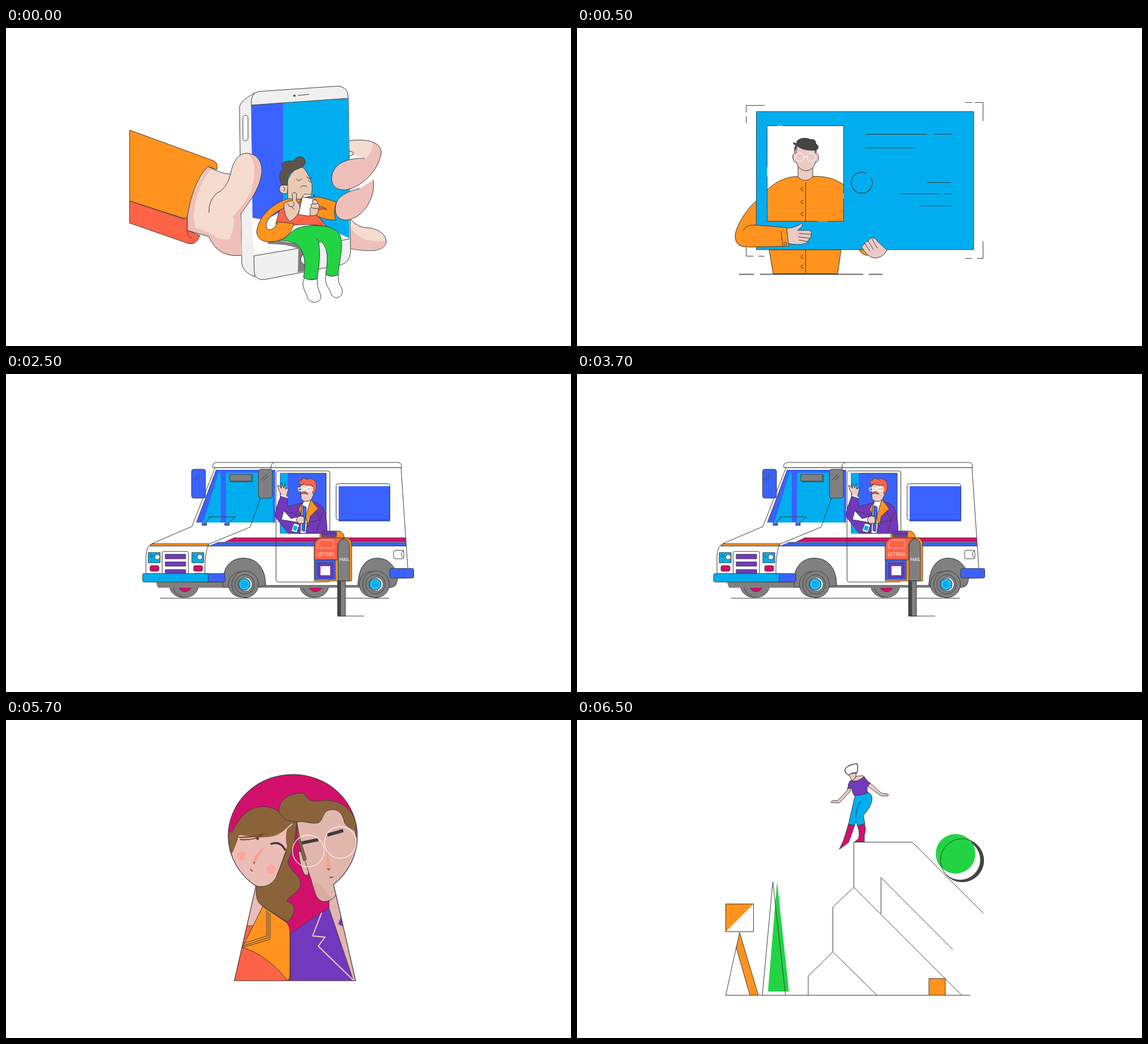
Recreate the animation shown at these times as an HTML page. Size 997 px wide and 561 px high, loop 8000 ms.

```html
<!DOCTYPE html>
<html lang="en">
<head>
<meta charset="utf-8">
<title>Five scenes</title>
<style>
html, body { margin: 0; width: 100%; height: 100%; overflow: hidden; background: #fff; }
svg { display: block; width: 100%; height: 100%; }
.scene { visibility: hidden; fill: none; stroke: #3c3c3c; stroke-width: 1; stroke-linejoin: round; }
.scene.on { visibility: visible; }
.o { fill: #ff931e; } .r { fill: #ff6347; } .b { fill: #3a62ff; } .c { fill: #00aeef; }
.g { fill: #22d444; } .v { fill: #7238bd; } .m { fill: #d2106b; } .w { fill: #fff; }
.s { fill: #f5dccf; } .p { fill: #efbfba; } .k { fill: #edcbc5; } .h { fill: #8b633b; }
.t { fill: #ecc9b3; } .ka { fill: #ebbdb6; } .kb { fill: #e1b6ad; }
.l { fill: #f0f0f0; } .y { fill: #808080; } .d { fill: #444; }
.x { stroke: none; }
text { font: 7.6px Lato, "Open Sans", sans-serif; fill: #fff; stroke: none; text-anchor: middle; }
</style>
</head>
<body>
<svg viewBox="0 0 997 561" preserveAspectRatio="none">
<defs>
  <clipPath id="photo"><path d="M335.500 172.500H470.500V341H335.500Z"/></clipPath>
  <clipPath id="keyhole"><path id="keypath" d="M441 293A114 109 0 0 1 392 205A114 109 0 0 1 620 205A114 109 0 0 1 578 290L617 460H403Z"/></clipPath>
  <clipPath id="hand"><path d="M356 244Q378 257 396 258C400 238 408 221 425 221C446 222 453 240 451 256C448 281 433 303 414 328L416 401Q374 406 358 368L320 357V334Q328 276 356 244Z"/></clipPath>
  <clipPath id="finger"><path d="M606 199C632 195 664 199 662 222C656 254 626 281 600 285.500C582 287 573 277 575 261C579 240 599 229 633 230L606 222Z"/></clipPath>
</defs>

<!-- phone -->
<g class="scene">
  <path class="o" d="M218 180L366 234Q375 238 372 250L356 244Q329 276 320 334Q318 338 308 334L218 305Z"/>
  <path class="r" d="M218 305L308 335Q316 338 320 334V357L342 366Q336 384 321 380L218 344Z"/>
  <path d="M320 357Q320 369 328 371"/>
  <path class="s" d="M607 336Q620 354 645 353Q671 360 671 377C667 399 629 393 606 389Z"/>
  <path class="p x" d="M608 352Q624 380 670 376C668 397 629 392 608 388Z"/>
  <path class="l" d="M412 140C414 128 429 121 439 114V439Q417 430 416 415Z"/>
  <path class="l" d="M433 136Q431 114 446 112L585 102.500Q603 103 604 122L608 395Q607 414 590 418L455 444Q438 444 438 430Z"/>
  <path class="w x" d="M434 330L606 345V372L437 402Z"/>
  <path class="b x" d="M433 136L490 132V342L435 334Z"/>
  <path class="c x" d="M489 132L604 124L606 371L560 350L489 340Z"/>
  <path d="M433 136L604 124M435 334L454 338M437 402L526 387M585 376L606 372"/>
  <rect class="w" x="418" y="154" width="9" height="45" rx="4.500"/>
  <circle class="d x" cx="509" cy="119.500" r="2"/>
  <path d="M515 119L535 117"/>
  <path class="y x" d="M462 376Q490 373 530 386L526 429L515 431L516 390Q500 381 462 381Z"/>
  <circle class="w" cx="530" cy="408" r="10"/>
  <!-- sitter -->
  <path class="w x" d="M481 326L478 345Q472 356 463 357Q455 348 466 334Z"/>
  <path class="r" d="M482 323Q490 303 515 302L555 303L549 330L566 350Q530 344 500 349L476 346Z"/>
  <path class="o" d="M542 297Q560 299 583 307Q577 322 582 339Q562 339 548 331L551 314Z"/>
  <path class="r" d="M553 315Q564 315 566 321Q562 317 552 321"/>
  <path class="o" d="M520 297C488 298 452 321 444 351C438 369 451 378 466 377C489 377 503 365 508 345L480 342C475 351 470 357 463 356C455 350 461 336 470 330Q481 321 495 315L520 306Z"/>
  <path class="g" d="M481 375C503 370 499 351 535 349C562 347 584 352 590 367C596 386 588 410 586 436Q574 441 564 434Q571 395 560 381Q553 373 552 380Q556 402 549 442Q535 447 525 440C530 411 526 389 510 380Q495 374 481 375Z"/>
  <path d="M552 380Q553 374 546 370"/>
  <path class="w" d="M527 441Q519 450 531 472Q533 484 545 484Q558 482 555 470Q547 453 550 442Q537 447 527 441ZM565 435Q560 446 571 462Q574 475 583 476Q596 474 593 460Q584 447 587 435Q575 441 565 435Z"/>
  <path class="t" d="M497 268Q509 243 524 246Q532 253 540 275Q541 288 538 297L517 302L497 301Z"/>
  <path class="t" d="M497 278Q484 273 482 284Q484 294 495 292"/>
  <path d="M489 281Q494 281 490 288M512 266Q517 273 522 265M530 262Q536 268 540 264M519 281Q525 276 531 280M533 268L538 273"/>
  <path fill="#5f5349" d="M487 277C480 264 483 253 490 248C481 237 496 233 508 235C511 225 526 224 528 235C529 243 521 246 514 249C500 254 496 261 497 271L495 277Z"/>
  <path class="t" d="M490 310Q498 304 506 305L505 293Q509 287 513 293L512 305Q521 311 518 321Q513 336 501 341Q491 334 490 310Z"/>
  <path d="M497 309Q498 316 505 315Q511 314 507 307M504 315L509 321"/>
  <path class="w" d="M523 298L527 293L544 294L545 299L536 332L516 329ZM523 298L542 301L545 294"/>
  <path class="t" d="M541 303Q551 302 550 309Q555 314 551 320Q552 329 544 331L536 331L537 324Q535 318 539 317Q536 311 541 310Z"/>
  <path d="M541 310Q546 312 550 309M539 317Q545 320 551 318"/>
  <!-- hand -->
  <g clip-path="url(#hand)">
    <path class="s x" d="M310 210H460V410H310Z"/>
    <path class="p x" d="M356 244L364 248Q335 278 331 336L334 352L357 361Q394 380 400 360Q405 327 398 335C412 318 436 297 438 259Q440 230 425 221H460V330L416 410H330L315 360V320Z"/>
    <path class="s x" d="M375 300L413 298L399 334Q403 355 395 372Q375 377 358 359Z"/>
  </g>
  <path d="M356 244Q378 257 396 258C400 238 408 221 425 221C446 222 453 240 451 256C448 281 433 303 414 328M416 401Q374 406 358 368L320 357V334Q328 276 356 244M396 258Q390 284 371 292Q357 306 358 326"/>
  <path class="p x" d="M648 268C653 296 632 336 600 339C583 338 578 325 583 308C589 293 607 288 624 283Z"/>
  <path d="M648 268C653 296 632 336 600 339C583 338 578 325 583 308C589 293 607 288 624 283"/>
  <g class="x" clip-path="url(#finger)"><path class="p" d="M570 190H670V290H570Z"/><path class="s" d="M606 190H644Q654 212 634 231Q614 229 600 234Z"/></g>
  <path d="M606 199C632 195 664 199 662 222C656 254 626 281 600 285.500C582 287 573 277 575 261C579 240 599 229 633 230M606 217Q614 218 613 223L606 226"/>
</g>

<!-- card -->
<g class="scene">
  <path class="o" d="M316 305C298 321 278 352 279 370Q281 388 302 386H340V305ZM339 391L346 433.500H460L466 391Z"/>
  <path class="c" d="M316.500 147.500H700V391H316.500Z"/>
  <g clip-path="url(#photo)">
    <path class="w x" d="M335 172H471V342H335Z"/>
    <path class="o" d="M330 291C348 272 370 261 391 262C430 261 450 260 475 280V345H330Z"/>
    <path class="k" d="M390 244V263Q403 275 416 263V244Z"/>
    <path class="k" d="M387 220Q379 221 381 230Q383 238 387 236Q390 251 404 252Q418 251 421 236Q426 237 426 229Q426 220 420 221V209H388Z"/>
    <path class="d x" d="M384 222Q382 211 386 206Q380 207 382 201Q389 206 387 200Q397 190 412 196Q422 195 422 204Q430 211 423 215L422 222L420 216Q399 218 388 208Z"/>
    <path stroke="#fff" d="M400 228a7 7.500 0 1 1-14 0a7 7.500 0 1 1 14 0M421 228a7.500 7.500 0 1 1-15 0a7.500 7.500 0 1 1 15 0M400 227H406"/>
    <path d="M403.500 272V341M400 285a2.500 2.500 0 1 1-1-3M400 308a2.500 2.500 0 1 1-1-3M400 329a2.500 2.500 0 1 1-1-3"/>
  </g>
  <path d="M353 172.500H335.500V246M335.500 262V341H425M442 341H470.500V301M470.500 292V172.500H363"/>
  <path d="M403.500 391V433M400 405a2.500 2.500 0 1 1-1-3M400 422a2.500 2.500 0 1 1-1-3"/>
  <path class="o x" d="M293 358Q297 347 314 347.500L370 352L374 385L302 386.500Z"/>
  <path d="M293 358Q297 347 314 347.500L370 352L374 385L302 386.500M360 358L363 385"/>
  <circle cx="367.500" cy="380.500" r="2.500"/>
  <path class="k" d="M370 353Q382 354 396 345Q402 347 389 357H410Q415 358 413 366Q413 372 409 373Q408 378 403 380Q389 384 373 380Z"/>
  <path d="M392 362.500L413 364M390 368.500L412 371M391 374L408 377"/>
  <path class="o" d="M498 391Q503 402 516 401L508 391Z"/>
  <path class="k" d="M502 386Q506 382 508 380Q510 375 514 376Q516 370 522 370Q528 371 530 376L547 392Q541 405 525 406Q512 404 502 386Z"/>
  <path d="M508 380L517 394M514 376L523 391M520 371L530 389"/>
  <path stroke-width="1.300" d="M511 256.500A18.500 18.500 0 1 0 519 264.500"/>
  <path d="M510 187.500H618M629 187.500H662M510 211.500H596M618 272.500H660M570 292.500H641M648 292.500H662M604 313.500H660"/>
  <path d="M331 136.500H298.500V149M298.500 156V168M685 131.500H697M702 131.500H716.500V164M298.500 387V402.500H311M320 402.500H331M716.500 376V406.500H706M685 406.500H697"/>
  <path stroke-width="1.600" d="M286 434.500H312M323 434.500H505M515 434.500H539"/>
</g>

<!-- truck -->
<g class="scene">
  <path d="M272 395.500H676"/>
  <g class="y"><circle cx="311" cy="371" r="23"/><circle cx="317" cy="371" r="23"/><circle cx="541" cy="371" r="23"/><circle cx="547" cy="371" r="23"/></g>
  <g class="m"><circle cx="316" cy="372" r="12"/><circle cx="546" cy="372" r="12"/></g>
  <path class="y x" d="M259 350H690V368Q688 377 676 377H268Z"/>
  <path class="w" d="M369 165L328 269L258 299Q248 303 247 320V352L356 367H383C383 340 397 325 419 325C444 325 458 344 458 373H621C622 342 634 325 655 325C676 325 686 339 690 360H707L709 342L697 165Z"/>
  <path class="y" d="M383 367C383 340 397 325 419 325C444 325 458 344 458 373L440 376H383ZM621 373C622 342 634 325 655 325C678 325 691 346 691 362Q689 377 674 377Z"/>
  <path class="w" d="M365 165Q363 156 373 156H692Q699 157 698 165ZM468 165Q466 158 474 156"/>
  <path class="b x" d="M371 169H475V262H336Z"/>
  <path class="c x" d="M375 174H379V262H348ZM388 174H471V262H388Z"/>
  <path d="M336 262L371 169M468 165L431 270L358 300Q350 316 351 352M357 252H405M361 252L350 264M405 252L390 265"/>
  <path class="b" d="M346 263H354V267H346ZM386 263H394V267H386Z"/>
  <rect class="y" x="395" y="177" width="38" height="12"/><path d="M435 177V190H396"/>
  <rect class="b" x="327.500" y="168" width="24.500" height="51" rx="4"/>
  <rect class="y" x="445.500" y="168" width="24.500" height="51" rx="4"/>
  <path d="M330 187L341 177M334 188L344 180M450 187L460 177M454 188L463 180"/>
  <path class="o" d="M258 299.500H358L356 303.500H254Z"/>
  <path class="m x" d="M401 289H705L706 295.500H387Z"/>
  <path class="b x" d="M373 297H706L707 303.500H357Z"/>
  <path d="M401 289H705M387 295.500H706M373 297H706M357 303.500H707"/>
  <path class="c" d="M251 315H272V333H251ZM328 315H349V333H328Z"/>
  <circle class="w" cx="267" cy="323" r="4.500"/><circle class="w" cx="342" cy="323" r="4.500"/>
  <path d="M253 320L258 324M255 318L261 322M330 320L335 324"/>
  <g class="m"><rect x="254" y="338" width="16" height="10" rx="3"/><rect x="331" y="338" width="16" height="10" rx="3"/></g>
  <rect x="275.500" y="313" width="46.500" height="40" rx="3"/>
  <path class="v" d="M281 318H317V326H281ZM281 331.500H317V339H281ZM281 345H317V352H281Z"/>
  <rect class="b" x="330" y="352" width="56.500" height="15" rx="3"/>
  <path class="c" d="M244 352H357V367H244Q241 367 241 364V355Q241 352 244 352Z"/>
  <rect class="b" x="677" y="343" width="42.500" height="17" rx="3"/>
  <rect class="w" x="684" y="311" width="18" height="15" rx="3"/><path d="M702 311Q693 318 702 325"/>
  <rect class="b x" x="587" y="198" width="91" height="62"/>
  <rect x="582.500" y="193.500" width="95" height="64" rx="4"/>
  <g id="wheel"><circle class="y" cx="415" cy="371" r="22.500"/><circle class="y" cx="422" cy="371" r="23.500"/><circle class="y" cx="421" cy="371" r="17"/><circle class="w" cx="422" cy="371" r="12.500"/><circle class="c" cx="420.500" cy="371" r="10.500"/><circle cx="420.500" cy="371" r="7.500" stroke="#7ad7ff"/></g>
  <use href="#wheel" x="231"/>
  <rect x="476.500" y="171" width="95" height="196" rx="4"/>
  <path class="b" d="M484 175H565V281H484Z"/>
  <path class="c x" d="M484.500 175H497V281H484.500Z"/>
  <!-- driver -->
  <path class="v" d="M486 213L496 217L497 234L522 227L541 225Q558 229 561 240Q568 262 566 281H498L475 252Q474 240 486 213Z"/>
  <path class="k" d="M486 214Q480 204 479 196Q484 197 486 202L486 192L490 201L493 193L493 203L499 201Q496 211 495 217Z"/>
  <path stroke="#fff" stroke-width="2" d="M485 214L497 218"/>
  <path class="w" d="M522 232L527 220L541 223L534 243L529 281H519Z"/>
  <path class="o" d="M538 221L551 238L537 251L533 270L529 251ZM523 226L516 239L520 247Z"/>
  <path class="b" d="M524 232L530 235L527 278L522 276Z"/>
  <path class="k" d="M519 198L521 221Q530 229 539 221L545 208V194H525Z"/>
  <path class="r" d="M518 196Q515 187 522 187L523 183Q532 187 537 184Q548 187 548 197Q548 208 542 212L540 196Q530 197 525 194ZM518 212Q526 203 533 212Q526 209 518 212Z"/>
  <path stroke="#fff" stroke-width="1.500" d="M516 201H526V206H517ZM530 200H541V206H531ZM526 202H530"/>
  <path class="w" d="M490 241L523 250L516 262L486 257ZM490 241L503 255L523 250"/>
  <path class="k" d="M514 253Q520 248 526 253V263L517 264L512 258Z"/>
  <path class="w" d="M508 263L518 266L513 280L503 277Z"/><path class="c x" d="M508 267L515 269L512 277L506 275Z"/>
  <path d="M546 241L555 257L529 264M559 244L548 279"/>
  <!-- mailbox -->
  <path class="y" d="M585 364H599V427H585Z"/><path class="d x" d="M585 364H591V427H585Z"/><path d="M585 427H632"/>
  <path class="o" d="M554 290V283Q557 277 567 277H588Q597 280 597 290Z"/>
  <path class="v" d="M557 278H583V287H557Z"/><path d="M558 282H584"/>
  <path class="o" d="M544 365V304Q545 289 558 289H600Q610 290 610 302V365Z"/>
  <path class="r" d="M544 328V304Q545 289 558 289H598Q585 292 585 305V328Z"/>
  <path class="y" d="M586 365V304Q588 292 597 291Q606 292 606 304V365Z"/>
  <path stroke="#ffc0ae" d="M549 307Q550 294 558 293H577Q579 294 578 307Z"/>
  <path class="b" d="M545 328H581V362H545Z"/><path class="v" d="M550 333H577V359H550Z"/><path class="w x" d="M555 339H572V355H555Z"/>
  <text x="564" y="321">LETTERS</text><text x="597" y="330">MAIL</text>
</g>

<!-- keyhole -->
<g class="scene">
  <g clip-path="url(#keyhole)">
    <path class="m x" d="M380 90H630V465H380Z"/>
    <path class="ka x" d="M440 290H470V370H400Z"/>
    <path class="r" d="M380 363H440L500 462H380Z"/>
    <path class="v" d="M502 376L571 330L620 465H502Z"/>
    <path class="kb" d="M570 318L582 290L622 460H613L570 332Z"/>
    <path class="v x" d="M586 360L594 340V364Z"/>
    <path stroke="#f5cdb5" stroke-width="2" d="M557 340L541 381L563 383L551 399L613 459"/>
    <path class="h" d="M385 245L391 214C403 188 419 153 452 153C475 153 482 163 490 168L513 178C511 207 508 228 497 250C503 270 520 273 520 290C518 307 498 309 496 320C514 325 511 345 496 356L452 328Q439 319 442 296Z"/>
    <path class="o" d="M453 329L417 401Q463 416 496 459Q502 460 501 440V372Q501 364 495 357Z"/>
    <path d="M460 336V381L420 394M463 339V384L419 398M466 341V387L418 401"/>
    <path class="ka x" d="M392 223Q402 205 413 203Q455 211 478 203L496 192Q492 210 496 223L476 279Q466 295 447 294Q420 288 399 251Z"/>
    <path d="M399 239Q398 246 415 271Q432 293 447 294Q466 295 476 279L496 229"/>
    <path class="h x" d="M385 235V200L413 196Q408 218 396 241Z"/>
    <path d="M411 207Q432 208 455 201M413 211Q435 213 451 204" stroke="#6d472c" stroke-width="2"/>
    <path d="M490 197L505 183" stroke="#e0c4bc" stroke-width="2"/>
    <circle class="d x" cx="444" cy="209" r="2.500"/>
    <path stroke-width="3.500" d="M467 219Q484 212 493 230"/>
    <circle cx="415" cy="240" r="8" fill="#ffa79d" class="x"/><circle cx="468" cy="263" r="8" fill="#ffa79d" class="x"/>
    <path fill="#ff9d8f" class="x" d="M456 224Q438 237 435 250L440 251Z"/><path class="h x" d="M435 250L440 251L438 255Z"/>
    <path stroke-width="1.500" d="M431 263L435 267"/>
    <path class="kb" d="M516 231Q519 261 527 273Q531 275 534 272L530 236Z"/>
    <path class="kb x" d="M513 178L552 178L562 155H590L605 190L625 197V250L579 292L582 309Q574 321 558 320Q551 317 547 308L520 225Z"/>
    <path d="M520 225L547 308Q551 317 558 320Q574 321 582 309"/>
    <path fill="#d6aca3" class="x" d="M540 286L552 288L575 315Q563 323 554 317Q549 313 547 308Z"/>
    <path class="h" d="M482 163C479 141 500 128 526 129L531 137Q537 144 550 143C575 139 605 143 618 182V207L616 196C608 189 600 189 597 180C594 164 586 158 575 158C557 160 561 175 552 181C540 185 527 177 513 180L495 177Z"/>
    <path class="h" d="M513 180L514 208L525 248L530 246L518 206Z"/>
    <path stroke-width="5.500" d="M522 217L551 211M567 203L595 195"/>
    <g stroke="#ffe9df" stroke-width="1.300"><circle cx="533.500" cy="231" r="28"/><circle cx="590" cy="216" r="28"/></g>
    <path fill="#ff9d8f" class="x" d="M567 229L573 261Q572 266 565 262Z"/><path class="h x" d="M566 262L573 262L569 266Z"/>
    <path d="M571 278L577 277" stroke-width="1.500"/>
  </g>
  <use href="#keypath" stroke-width="1.200"/>
</g>

<!-- cliff -->
<g class="scene">
  <path class="o x" d="M262 324H312L262 374ZM287 375L320 485.500H305L281 401Z"/>
  <path class="g x" d="M353 285L374 479H337Z"/>
  <path d="M262.500 324.500H311.500V373.500H262.500ZM305 485.500L281 401L287 375L320 485.500M281 401L262.500 485.500M327 485.500L345.500 285L368 485.500"/>
  <path d="M262 485.500H694M408 485.500V452L451.500 409L529 485.500M451.500 409V330L488.500 295L679 485.500M488.500 295V215.500H591.500L717 341M536.500 342V278L663 405"/>
  <path class="o" d="M621 456H650V485.500H621Z"/>
  <circle class="d x" cx="680" cy="248" r="38"/>
  <circle class="w x" cx="676" cy="246.500" r="35.500"/>
  <circle class="g x" cx="668" cy="236" r="35"/>
  <circle cx="679.500" cy="247.500" r="38"/>
  <!-- walker -->
  <path class="k" d="M483 119L482 126L463 146H449Q447 144 452 142H460L477 124L478 119ZM516 110L537 129L549 131Q551 134 546 134H537L513 117ZM489 100L504 98L508 101Q500 110 484 107Z"/>
  <path class="m" d="M479 184L490 185Q484 204 479 216L463 228L470 213ZM494 185L507 182Q511 193 507 203L507 215H490L497 209Q500 198 494 185Z"/>
  <path class="c" d="M491 132L513 127Q523 132 520 144Q516 158 505 168L508 183L495 186L492 179L490 186L479 184Z"/>
  <path d="M500 143Q490 163 492 180"/>
  <path class="v" d="M482 107Q494 111 506 100L517 112L512 118V129Q500 134 489 133Q484 124 485 120L478 121Q478 112 482 107Z"/>
  <path class="k" d="M479 95L493 94L491 103L485 107Z"/>
  <path class="w" stroke-width="1.400" d="M479 97Q470 92 474 85Q481 78 494 77Q497 83 494 93Q487 92 479 97Z"/>
</g>
</svg>
<script>
const LOOP = 8000;
const starts = [0, 500, 2500, 4500, 6500];
const scenes = [...document.querySelectorAll('.scene')];
const t0 = performance.now();

function draw(now) {
  const t = Math.max(0, now - t0) % LOOP;
  const current = starts.findLastIndex(s => t >= s);
  scenes.forEach((scene, i) => scene.classList.toggle('on', i === current));
}

function tick() {
  draw(performance.now());
  requestAnimationFrame(tick);
}
tick();
</script>
</body>
</html>
```
